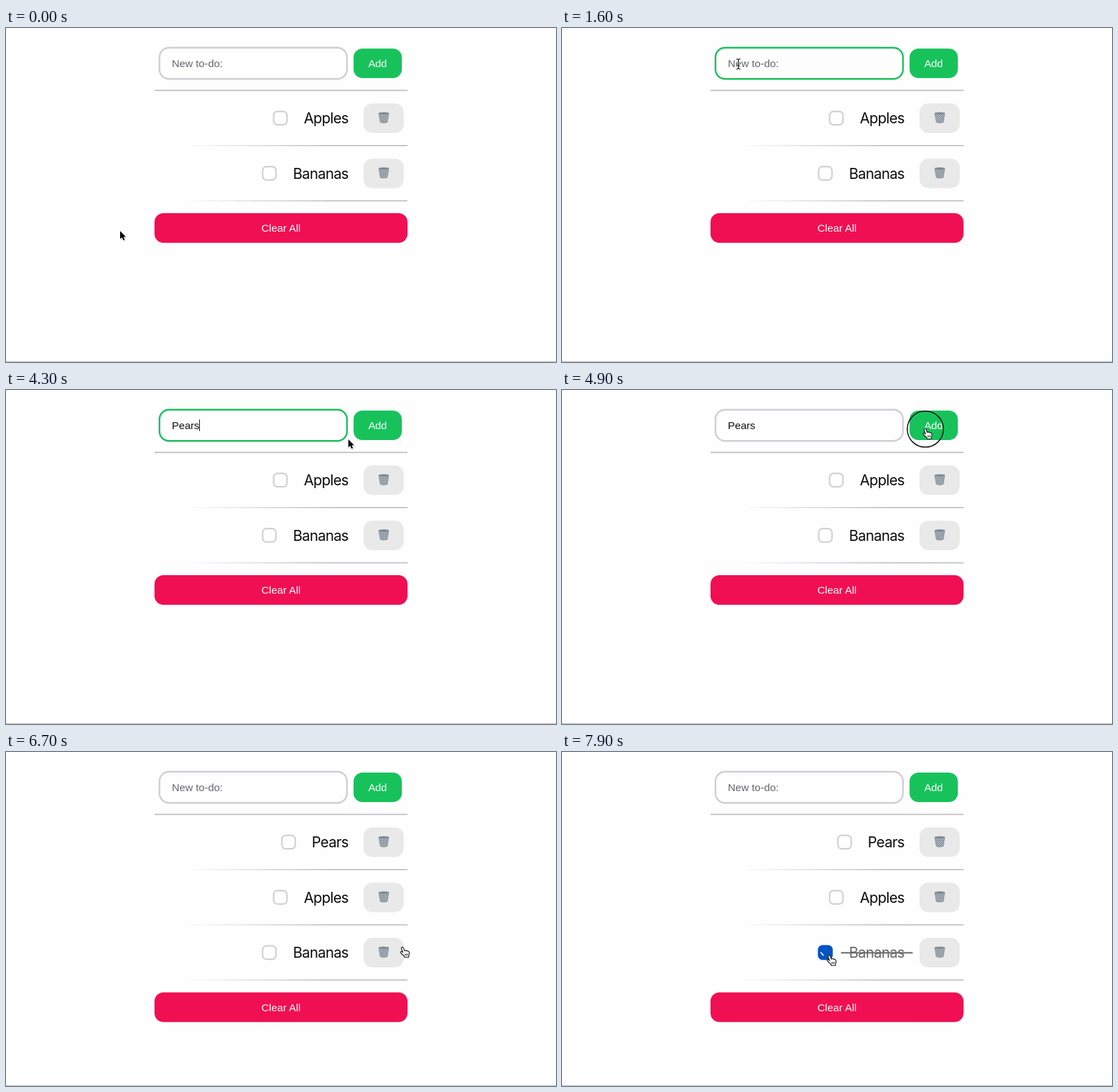
An HTML page for the animation above (8 s loop, 800x487 px).

```html
<!DOCTYPE html>
<html lang="en">
<head>
<meta charset="utf-8">
<title>To-do list</title>
<style>
  html, body { margin: 0; width: 100%; height: 100%; overflow: hidden; background: #fefdff; }
  svg { display: block; width: 800px; height: 487px; }
  text { font: 15.3px "Liberation Sans", Arial, sans-serif; white-space: pre; }
  .label { font: 21px Inter, sans-serif; letter-spacing: -.65px; text-anchor: end; fill: #0b0b0c; }
  .button { text-anchor: middle; fill: #fff; }
  .box { fill: #fefdff; stroke: #d2d0d4; stroke-width: 2.2; }
  .done .box { fill: #0453c2; stroke: #0453c2; }
  .done .label { fill: #666; }
  .strike, .tick { visibility: hidden; fill: none; }
  .strike { stroke: #666; stroke-width: 2; }
  .tick { stroke: #fff; stroke-width: 1.7; stroke-linecap: round; }
  .done .strike, .ticked .tick { visibility: visible; }
  #field { fill: #fefdff; stroke: #d0ced2; stroke-width: 2.4; }
  #field.focus { stroke: #19c05a; }
</style>
</head>
<body>
<svg viewBox="0 0 800 487">
  <defs>
    <linearGradient id="fade" gradientUnits="userSpaceOnUse" x1="216" y1="0" x2="584" y2="0">
      <stop offset=".12" stop-color="#aaa" stop-opacity="0"/>
      <stop offset=".7" stop-color="#aaa"/>
    </linearGradient>
    <pattern id="mesh" width="3" height="3" patternUnits="userSpaceOnUse">
      <path d="M0 0L3 3M3 0L0 3" stroke="#6b7780" stroke-width=".6"/>
    </pattern>
    <g id="bin">
      <path id="pail" d="M542.3 124.5H556.7L554.6 137.4Q549.5 139.4 544.4 137.4Z" fill="#b3bcc3"/>
      <use href="#pail" style="fill:url(#mesh)"/>
      <path d="M542.3 124.5H556.7L554.6 137.4Q549.5 139.4 544.4 137.4Z" fill="url(#mesh)" stroke="#87929b" stroke-width=".8"/>
      <ellipse cx="549.5" cy="124.5" rx="7.5" ry="1.4" fill="#76828b" stroke="#929ca4" stroke-width=".8"/>
    </g>
  </defs>

  <rect id="field" x="223.2" y="28.7" width="272.8" height="45.6" rx="14"/>
  <text id="entry" x="241.2" y="57"></text>
  <rect id="caret" y="43" width="1" height="17" fill="#111"/>
  <rect x="505.5" y="30" width="70.3" height="43" rx="13" fill="#18c25b"/>
  <text class="button" x="540.5" y="57">Add</text>
  <path d="M216 91H584" stroke="#b8b7b9" stroke-width="1.3"/>

  <g id="rows"></g>

  <g id="clear">
    <rect x="216" y="270" width="368" height="43.3" rx="13" fill="#f00f52"/>
    <text class="button" x="400" y="297">Clear All</text>
  </g>
  <path d="M0 486.5H800" stroke="#b9b8ba"/>

  <circle id="ring" r="26.3" fill="none" stroke="#111" stroke-width="1.5"/>
  <g id="pointer" stroke-linejoin="round">
    <g id="arrow">
      <path d="M.8 1.5V14L3.7 11.4L5.6 15.6L8 14.5L6.2 10.4H10Z" fill="#000" opacity=".2"/>
      <path d="M0 0V11.6L2.7 9.2L4.6 13.6L6.7 12.7L4.9 8.4H8.4Z" stroke="#fff" stroke-width="1.6" paint-order="stroke"/>
    </g>
    <g id="beam" fill="none">
      <path d="M-3-7.5Q0-7.5 0-5Q0-7.5 3-7.5M0-5V5M-3 7.5Q0 7.5 0 5Q0 7.5 3 7.5M-1.8 2H1.8" stroke="#fff" stroke-width="2.6" opacity=".7"/>
      <path d="M-3-7.5Q0-7.5 0-5Q0-7.5 3-7.5M0-5V5M-3 7.5Q0 7.5 0 5Q0 7.5 3 7.5M-1.8 2H1.8" stroke="#111" stroke-width="1.1"/>
    </g>
    <g id="hand" stroke="#111" stroke-width="1.1">
      <path d="M-2 1C-2-.8 .4-1.2 1.1.6L2.8 5C3.5 4 5 4.1 5.4 5C6.2 4.3 7.4 4.7 7.7 5.7C8.7 5.3 9.4 6.1 9.5 7.2C9.8 9.5 9.6 11 8.7 12.7V14.2H2.4V13C.9 11.2-1.3 9.6-2.9 7.8C-3.9 6.5-2.6 5.2-1.3 6L.2 7.2Z" fill="#fff"/>
      <path d="M3.6 9V12M5.4 9V12M7.2 9V12" stroke-width=".8"/>
    </g>
  </g>
</svg>

<script>
const LOOP = 8000, STEP = 100, PITCH = 80.5;
const $ = id => document.getElementById(id);
const show = (el, on) => el.style.visibility = on ? "visible" : "hidden";
const within = (t, from, to) => t >= from && t < to;

// Pointer hotspot: time, x, y
const path = [
  [400, 166, 296], [500, 170, 287], [700, 208, 190], [900, 250, 70],
  [1100, 256, 54], [1600, 256.5, 52.5], [1800, 488, 68],
  [4100, 488, 68], [4300, 498, 72], [4500, 517, 63], [4700, 528.5, 57],
  [5100, 528.5, 57], [5300, 531, 59], [5400, 531, 59], [5600, 551, 73],
  [5800, 612, 190], [6000, 636, 268], [6200, 636, 268], [6400, 630, 274],
  [6700, 577, 285], [7000, 432, 297], [7100, 404, 299], [7400, 389, 297]
];
const clicks = [1100, 4900, 7600];
const keys = [1900, 2300, 2700, 3100, 3200];
const caretX = ["", "P", "Pe", "Pea", "Pear", "Pears"];

function makeRow(name, boxX) {
  const mid = boxX + 10.7;
  const row = document.createElementNS("http://www.w3.org/2000/svg", "g");
  row.innerHTML = `
    <rect class="box" x="${mid - 9.7}" y="121.7" width="19.4" height="19.4" rx="5.5"/>
    <path class="tick" d="M${mid - 6.3} 131.5l3.3 3.7"/>
    <text class="label" x="498" y="139.4">${name}</text>
    <path class="strike" d="M${boxX + 33.5} 131.8H510"/>
    <rect x="520" y="110" width="58.6" height="43" rx="13" fill="#e9e9ea"/>
    <use href="#bin"/>
    <rect x="216" y="170.9" width="368" height="1.2" fill="url(#fade)"/>`;
  return $("rows").appendChild(row);
}
const pears = makeRow("Pears", 400.3);
const apples = makeRow("Apples", 388.3);
const bananas = makeRow("Bananas", 372.3);

function hotspot(t) {
  const i = path.findIndex(p => p[0] > t);
  if (i === 0) return path[0].slice(1);
  if (i < 0) return path[path.length - 1].slice(1);
  const [t0, x0, y0] = path[i - 1], [t1, x1, y1] = path[i];
  const k = (t - t0) / (t1 - t0);
  return [x0 + (x1 - x0) * k, y0 + (y1 - y0) * k];
}

function pointerKind(x, y) {
  const over = (l, t, r, b) => x > l && x < r && y > t && y < b;
  if (over(222, 27, 497, 76)) return "beam";
  if (over(505, 30, 576, 74) || over(520, 271, 579, 314) || over(372, 281, 510, 304)) return "hand";
  return "arrow";
}

function drawEntry(t, focused) {
  const typed = t < 5000 ? keys.filter(k => k <= t).length : 0;
  const word = caretX[typed], entry = $("entry");
  const text = word || "New to-do:";
  if (entry.textContent !== text) entry.textContent = text;
  entry.setAttribute("fill", word ? "#111" : "#67666a");
  const lastInput = typed ? keys[typed - 1] : 1100;
  show($("caret"), focused && (t - lastInput) % 1000 < 500);
  $("caret").setAttribute("x", typed ? Math.floor(241.2 + entry.getComputedTextLength()) : 241);
}

function draw(t) {
  const focused = within(t, 1100, 4900), added = t >= 5000;
  $("field").classList.toggle("focus", focused);
  drawEntry(t, focused);

  show(pears, added);
  const shift = added ? PITCH : 0;
  const place = (el, y) => el.setAttribute("transform", `translate(0 ${y})`);
  place(apples, shift);
  place(bananas, PITCH + shift);
  place($("clear"), shift);
  bananas.classList.toggle("done", t >= 7700);
  bananas.classList.toggle("ticked", t >= 7900);

  const [x, y] = hotspot(t), kind = pointerKind(x, y);
  const visible = !within(t, 1900, 4000);
  $("pointer").setAttribute("transform", `translate(${x} ${y})`);
  for (const id of ["arrow", "beam", "hand"]) show($(id), visible && id === kind);
  $("ring").setAttribute("transform", `translate(${x} ${y})`);
  show($("ring"), clicks.some(c => within(t, c, c + 200)));
}

const start = performance.now();
function tick() {
  const t = (performance.now() - start) % LOOP;
  draw(Math.floor(t / STEP) * STEP);
  requestAnimationFrame(tick);
}
tick();
</script>
</body>
</html>
```
